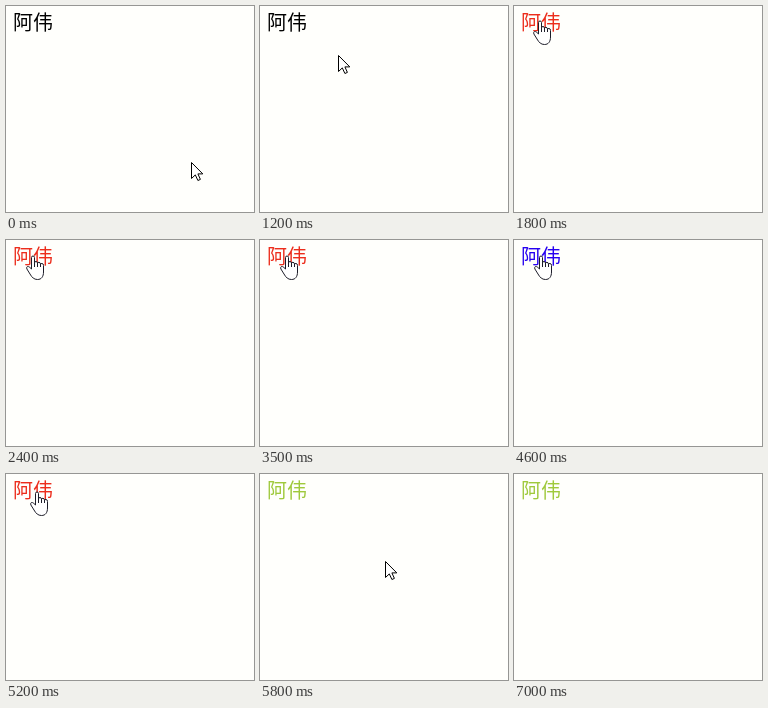
Recreate the animation shown at these times as an HTML page. Size 248 px wide and 206 px high, loop 7.4 s.

```html
<!DOCTYPE html>
<html lang="zh-CN">
<meta charset="utf-8">
<title>Link states</title>
<style>
html, body { margin: 0; width: 100%; height: 100%; overflow: hidden; background: #fffffc; }
svg { display: block; }
text { font: 20px "Noto Sans CJK SC", "Noto Sans CJK", sans-serif; }
path { fill: #fff; stroke: #000; stroke-linejoin: round; }
#hand path { stroke: #1c1c28; }
</style>
<svg width="248" height="206" viewBox="0 0 248 206">
  <text id="link" x="7" y="24">阿伟</text>
  <path id="arrow" d="M.5 .5V16.5L4.3 12.9L6.9 18.5L9.4 17.4L6.9 11.9H11.8Z"/>
  <g id="hand">
    <path d="M5.5 14V2.5Q5.5 1 7 1T8.5 2.5V7.8Q8.7 6.5 10 6.5T11.5 8Q11.8 7.3 13 7.3T14.5 9Q14.8 8.5 16 8.5Q17.5 8.5 17.5 10.5V17C17.5 21.5 15.5 24.5 11.5 24.5C8 24.5 6 22.5 4 19L.9 14Q.2 12.2 1.3 11.6Q2.6 11.2 3.8 12.4Z"/>
    <path d="M8.5 7.5V12M11.5 8V12M14.5 9V12" fill="none"/>
  </g>
</svg>
<script>
const LOOP = 7400;
const BLACK = '#000', RED = '#ec2d1c', BLUE = '#2600f0', GREEN = '#9fc93c';
const $ = id => document.getElementById(id);
const link = $('link'), cursors = { arrow: $('arrow'), hand: $('hand') };

// start time, cursor, left, top, link colour; each pose holds until the next
const poses = [
  [0, 'arrow', 185, 156, BLACK],
  [900, 'arrow', 150, 118, BLACK],
  [1000, 'arrow', 98, 68, BLACK],
  [1200, 'arrow', 78, 49, BLACK],
  [1300, 'arrow', 64, 40, BLACK],
  [1500, 'arrow', 53, 33, BLACK],
  [1600, 'arrow', 47, 29, BLACK],
  [1800, 'hand', 19, 14, RED],
  [1900, 'hand', 20, 15, RED],
  [3900, 'hand', 20, 15, BLUE],
  [4700, 'hand', 21, 11, RED],
  [4800, 'hand', 23, 4, RED],
  [4900, 'hand', 24, 0, RED],
  [5000, 'hand', 24, 6, RED],
  [5100, 'hand', 24, 13, RED],
  [5200, 'hand', 24, 17, RED],
  [5300, 'hand', 30, 17, RED],
  [5400, 'arrow', 70, 45, GREEN],
  [5500, 'arrow', 110, 75, GREEN],
  [5600, 'arrow', 125, 87, GREEN],
  [6900, 'arrow', 140, 87, GREEN],
  [7000, 'none', 0, 0, GREEN]
];

function draw() {
  const t = performance.now() % LOOP;
  const [, cursor, x, y, color] = poses.findLast(p => p[0] <= t);
  link.setAttribute('fill', color);
  for (const name in cursors) {
    cursors[name].setAttribute('transform', `translate(${x} ${y})`);
    cursors[name].style.display = name === cursor ? '' : 'none';
  }
  requestAnimationFrame(draw);
}
draw();
</script>
</html>
```
